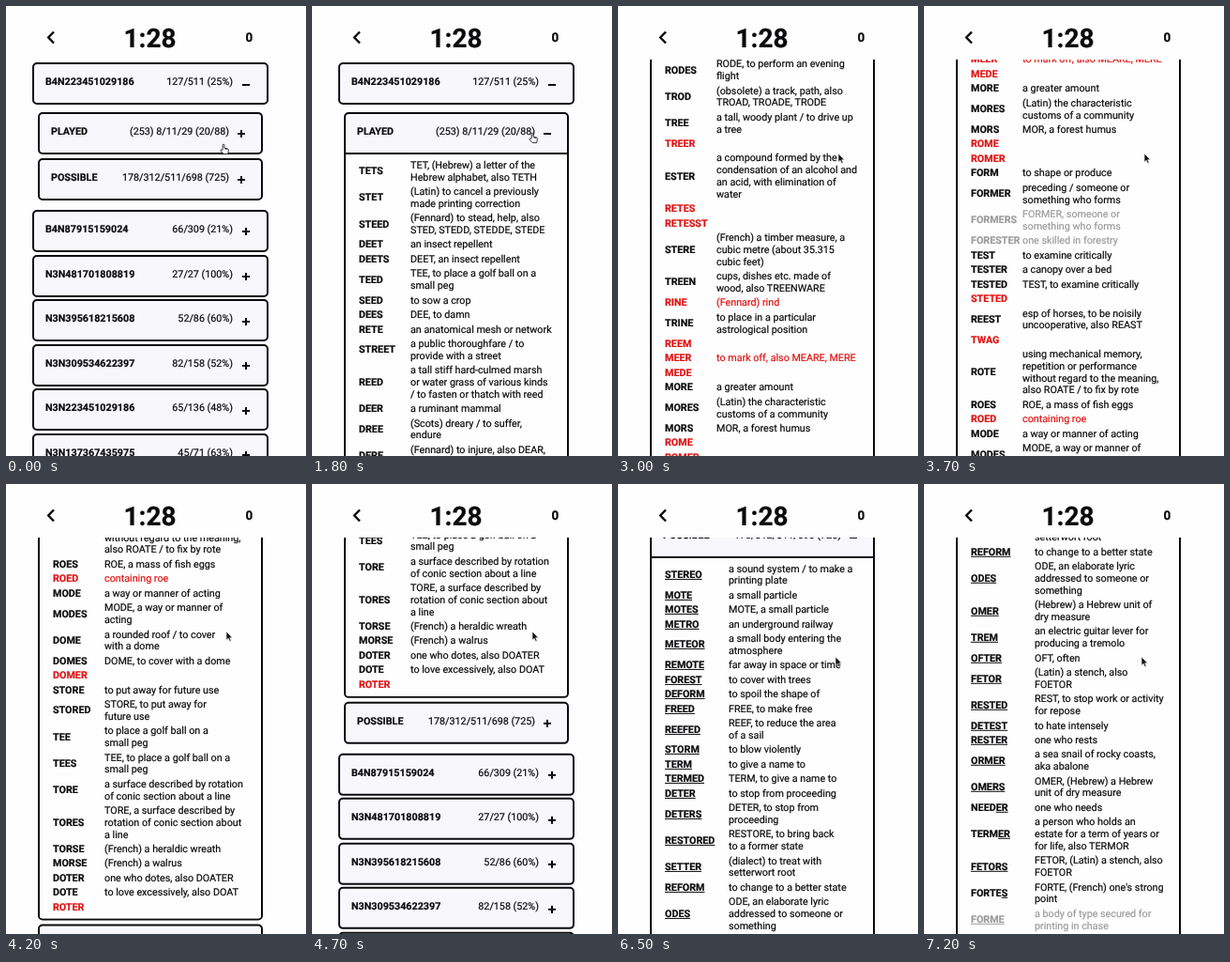
Recreate the animation shown at these times as an HTML page. Size 320 by 479 pixels, loop 7300 ms.

```html
<!DOCTYPE html>
<html lang="en">
<head>
<meta charset="utf-8">
<title>Word game results</title>
<style>
  * { box-sizing: border-box; }
  html, body { margin: 0; width: 100%; height: 100%; overflow: hidden; background: #fefefe; }
  body { position: relative; font: 10.75px/12.77px Roboto, sans-serif; color: #0b0b0d; text-rendering: geometricPrecision; -webkit-text-stroke: .2px; }
  nav { position: absolute; inset: 0 0 auto; height: 57px; font-weight: bold; }
  nav * { position: absolute; }
  nav svg { left: 42px; top: 25px; }
  .clock { left: 93.5px; width: 120px; top: 18px; text-align: center; font-size: 28px; line-height: 34px; }
  .score { left: 239.3px; width: 40px; top: 25px; text-align: center; font-size: 13.4px; line-height: 20px; }
  main { position: absolute; inset: 57px 0 0; overflow: hidden; }
  #page { position: absolute; top: -57px; left: 0; width: 320px; padding-top: 60px; display: flex; flex-direction: column; }
  section { width: 252px; margin: 0 0 2.6px 28px; border: 2px solid #0b0b0d; border-radius: 5px; background: #f8f7fb; overflow: hidden; }
  .group { margin: 5.4px 0 6px; }
  .group section { width: 240px; margin: 0 0 4px 34px; }
  header { position: relative; height: 41px; padding-left: 12px; line-height: 37px; }
  header span { position: absolute; right: 36px; }
  header i, header i::after { position: absolute; width: 8px; height: 2px; background: #0b0b0d; }
  header i { right: 18px; top: 20.5px; }
  header i::after { content: ""; transform: rotate(90deg); }
  .open i::after { display: none; }
  .group header span { right: 34px; }
  .group header i { right: 17px; }
  .group .open header { height: 43.5px; border-bottom: 2px solid #0b0b0d; }
  .list { display: none; padding: 4px 0 3.8px 14px; background: #fefefe; }
  .open .list { display: block; }
  .row { display: grid; grid-template-columns: var(--column) 1fr; align-items: center; padding: 1.345px 0; white-space: pre; }
  .wrong { color: #e01212; }
  .missed { color: #9b9b9b; }
  #cursor { position: absolute; left: 0; top: 0; overflow: visible; }
</style>
</head>
<body>
<nav>
  <svg width="12" height="17"><path d="M9 2.5L3.2 8.5L9 14.5" fill="none" stroke="#0b0b0d" stroke-width="2.4"/></svg>
  <div class="clock">1:28</div>
  <div class="score">0</div>
</nav>
<main><div id="page"></div></main>
<svg id="cursor" width="1" height="1">
  <path id="arrow" d="M0 0V9.2L2.1 7.3L3.6 10.6L5.1 9.9L3.7 6.7H6.5Z" fill="#111" stroke="#fff" stroke-width=".6"/>
  <path id="hand" d="M-.9 6.2V1.1A.9 .9 0 0 1 .9 1.1V4.2L4.3 4.9Q5.6 5.3 5.4 6.6L4.7 10.6H.2L-3.4 6.8Q-2.8 5.2 -.9 6.6M2.3 4.6V6M3.9 5V6.2" fill="#fff" stroke="#222" stroke-width=".9"/>
</svg>
<script>
// Row syntax: "!" wrong word, "~" missed word, "_" starts the underline, "|" breaks a line.
const played = `TETS TET, (Hebrew) a letter of the|Hebrew alphabet, also TETH
STET (Latin) to cancel a previously|made printing correction
STEED (Fennard) to stead, help, also|STED, STEDD, STEDDE, STEDE
DEET an insect repellent
DEETS DEET, an insect repellent
TEED TEE, to place a golf ball on a|small peg
SEED to sow a crop
DEES DEE, to damn
RETE an anatomical mesh or network
STREET a public thoroughfare / to|provide with a street
REED a tall stiff hard-culmed marsh|or water grass of various kinds|/ to fasten or thatch with reed
DEER a ruminant mammal
DREE (Scots) dreary / to suffer,|endure
DERE (Fennard) to injure, also DEAR,|DEARE
DERES DERE, (Fennard) to injure
REEDS REED, to fasten or thatch|with reed
STEER to direct the course of
!STEERD
TREES TREE, a tall, woody plant / to|drive up a tree
RESET to set again
TERSE succinct, concise
REST to stop work or activity|for repose
DESERT to abandon / a dry, barren|region
!TREDE
RODE to perform an evening flight
ROD a straight slender stick / to|push a rod through
RODES RODE, to perform an evening|flight
TROD (obsolete) a track, path, also|TROAD, TROADE, TRODE
TREE a tall, woody plant / to drive up|a tree
!TREER
ESTER a compound formed by the|condensation of an alcohol and|an acid, with elimination of|water
!RETES
!RETESST
STERE (French) a timber measure, a|cubic metre (about 35.315|cubic feet)
TREEN cups, dishes etc. made of|wood, also TREENWARE
!RINE (Fennard) rind
TRINE to place in a particular|astrological position
!REEM
!MEER to mark off, also MEARE, MERE
!MEDE
MORE a greater amount
MORES (Latin) the characteristic|customs of a community
MORS MOR, a forest humus
!ROME
!ROMER
FORM to shape or produce
FORMER preceding / someone or|something who forms
~FORMERS FORMER, someone or|something who forms
~FORESTER one skilled in forestry
TEST to examine critically
TESTER a canopy over a bed
TESTED TEST, to examine critically
!STETED
REEST esp of horses, to be noisily|uncooperative, also REAST
!TWAG
ROTE using mechanical memory,|repetition or performance|without regard to the meaning,|also ROATE / to fix by rote
ROES ROE, a mass of fish eggs
!ROED containing roe
MODE a way or manner of acting
MODES MODE, a way or manner of|acting
DOME a rounded roof / to cover|with a dome
DOMES DOME, to cover with a dome
!DOMER
STORE to put away for future use
STORED STORE, to put away for|future use
TEE to place a golf ball on a|small peg
TEES TEE, to place a golf ball on a|small peg
TORE a surface described by rotation|of conic section about a line
TORES TORE, a surface described by|rotation of conic section about|a line
TORSE (French) a heraldic wreath
MORSE (French) a walrus
DOTER one who dotes, also DOATER
DOTE to love excessively, also DOAT
!ROTER`;

const possible = `_STEREO a sound system / to make a|printing plate
_MOTE a small particle
_MOTES MOTE, a small particle
_METRO an underground railway
_METEOR a small body entering the|atmosphere
_REMOTE far away in space or time
_FOREST to cover with trees
_DEFORM to spoil the shape of
_FREED FREE, to make free
_REEFED REEF, to reduce the area|of a sail
_STORM to blow violently
_TERM to give a name to
_TERMED TERM, to give a name to
_DETER to stop from proceeding
_DETERS DETER, to stop from|proceeding
_RESTORED RESTORE, to bring back|to a former state
_SETTER (dialect) to treat with|setterwort root
_REFORM to change to a better state
_ODES ODE, an elaborate lyric|addressed to someone or|something
_OMER (Hebrew) a Hebrew unit of|dry measure
_TREM an electric guitar lever for|producing a tremolo
_OFTER OFT, often
_FETOR (Latin) a stench, also|FOETOR
_RESTED REST, to stop work or activity|for repose
_DETEST to hate intensely
_RESTER one who rests
_ORMER a sea snail of rocky coasts,|aka abalone
_OMERS OMER, (Hebrew) a Hebrew|unit of dry measure
NEED_ER one who needs
TERM_ER a person who holds an|estate for a term of years or|for life, also TERMOR
_FETORS FETOR, (Latin) a stench, also|FOETOR
FORTE_S FORTE, (French) one's strong|point
~_FORME a body of type secured for|printing in chase
_FORMED FORM, to shape or produce`;

const LOOP = 7300, STEP = 100;
const $ = id => document.getElementById(id);
const page = $('page');
const rows = {};

function add(parent, tag, className, html = '') {
  const node = document.createElement(tag);
  node.className = className;
  node.innerHTML = html;
  return parent.appendChild(node);
}

function addCard(parent, title, value, className = '') {
  const card = add(parent, 'section', className);
  add(card, 'header', '', `<b>${title}</b><span>${value}</span><i></i>`);
  return card;
}

function addList(card, text, column) {
  const list = add(card, 'div', 'list');
  list.style.setProperty('--column', column + 'px');
  for (const line of text.split('\n')) {
    const [, flag, word, meaning] = line.match(/^([!~]?)(\S+) ?(.*)/);
    const kind = { '!': 'wrong', '~': 'missed' }[flag] || '';
    rows[word] = add(list, 'div', 'row ' + kind,
      `<b>${word.replace(/_(.*)/, '<u>$1</u>')}</b><span>${meaning.replaceAll('|', '\n')}</span>`);
  }
}

addCard(page, 'B4N223451029186', '127/511 (25%)', 'open');
const group = add(page, 'div', 'group');
const playedCard = addCard(group, 'PLAYED', '(253) 8/11/29 (20/88)', 'open');
const possibleCard = addCard(group, 'POSSIBLE', '178/312/511/698 (725)', 'open');
addList(playedCard, played, 55);
addList(possibleCard, possible, 68);
for (const [title, value] of [
  ['B4N87915159024', '66/309 (21%)'], ['N3N481701808819', '27/27 (100%)'],
  ['N3N395618215608', '52/86 (60%)'], ['N3N309534622397', '82/158 (52%)'],
  ['N3N223451029186', '65/136 (48%)'], ['N3N137367435975', '45/71 (63%)'],
]) addCard(page, title, value);

// Scroll offset that puts the middle of a word's row at height y.
function scrollTo(word, y) {
  const box = rows[word].getBoundingClientRect();
  return (box.top + box.bottom) / 2 - y;
}

const rest = scrollTo('ROTER', 153.5), end = scrollTo('_REFORM', 73);
// time, offset, speed in px per ms
const scrollKeys = [
  [0, 0, 0], [2000, 0, 0],
  [3000, scrollTo('RODES', 69), .45],
  [3700, scrollTo('MEDE', 73), .55],
  [4700, scrollTo('ROTER', 214), .14],
  [5500, rest, 0], [6000, rest, 0],
  [7200, end, .4], [LOOP, end, 0],
];
// time, x, y
const cursorKeys = [
  [0, 232, 147], [400, 232, 147], [600, 254, 190], [800, 259, 243], [1100, 235, 135],
  [1800, 235, 135], [1900, 235, 157], [5200, 235, 157], [5500, 232, 184], [LOOP, 232, 184],
];

function segment(keys, t) {
  const i = keys.findIndex(key => key[0] > t), a = keys[i - 1], b = keys[i];
  return [a, b, (t - a[0]) / (b[0] - a[0])];
}

function scrollAt(t) {
  const [[t0, p0, v0], [t1, p1, v1], u] = segment(scrollKeys, t);
  const d = t1 - t0, w = 1 - u;
  return w * w * (p0 * (1 + 2 * u) + v0 * d * u) + u * u * (p1 * (1 + 2 * w) - v1 * d * w);
}

function draw(now) {
  const t = Math.floor(now % LOOP / STEP) * STEP;
  playedCard.classList.toggle('open', t >= 1800);
  possibleCard.classList.toggle('open', t >= 6000);
  page.style.transform = `translateY(${-scrollAt(t)}px)`;

  const [a, b, u] = segment(cursorKeys, t);
  const [x, y] = [1, 2].map(k => a[k] + (b[k] - a[k]) * u);
  const pointing = t < 1900 || (t >= 5400 && t <= 6000);
  $('cursor').style.transform = `translate(${x}px, ${y}px)`;
  $('hand').style.display = pointing ? '' : 'none';
  $('arrow').style.display = pointing ? 'none' : '';
}

const start = performance.now();
(function frame() {
  draw(performance.now() - start);
  requestAnimationFrame(frame);
})();
</script>
</body>
</html>
```
